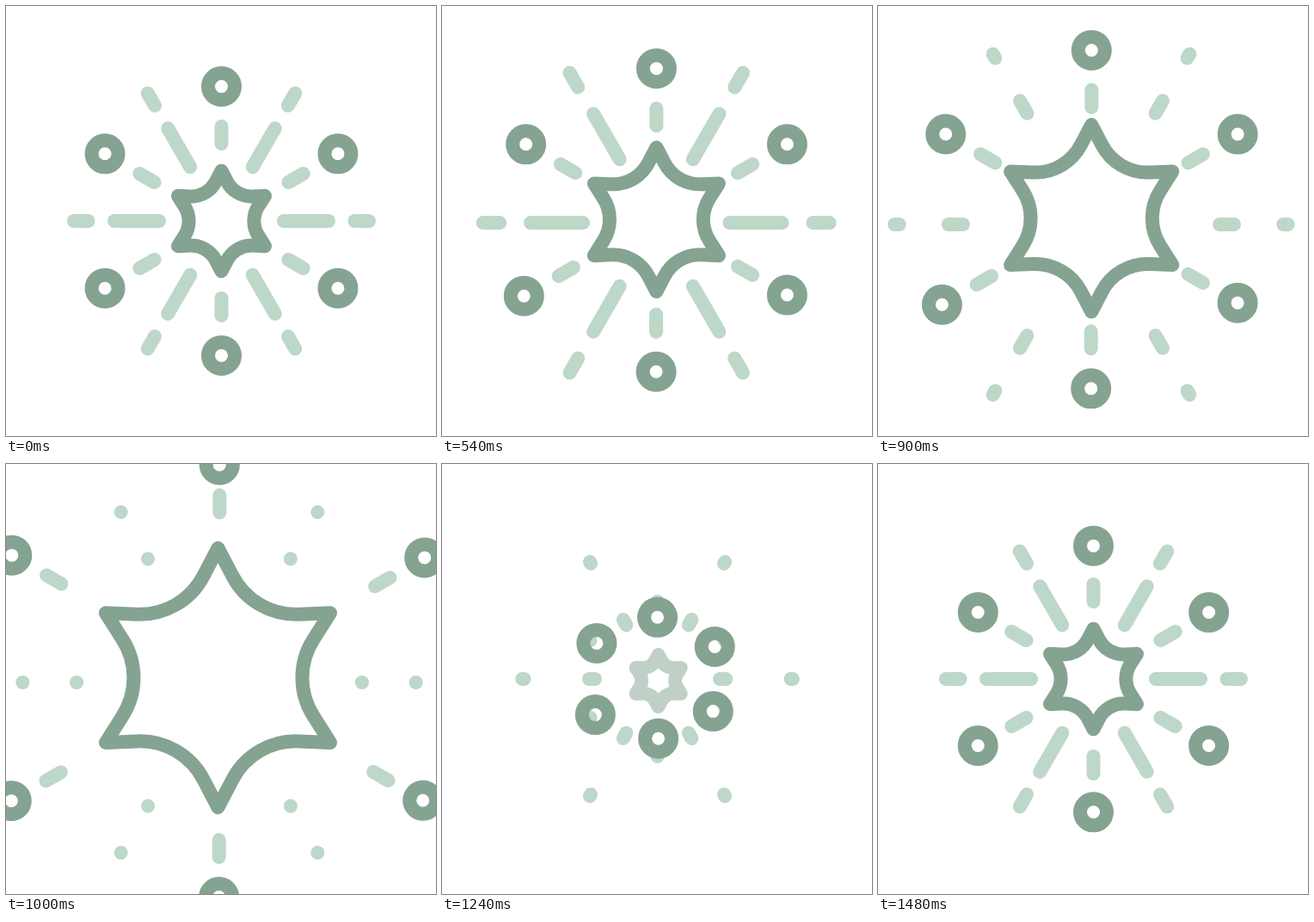
These frames come from a looping animation (500 px wide and 500 px high, 1500 ms). An HTML page with a canvas:

```html
<!DOCTYPE html>
<html lang="en">
<head>
<meta charset="utf-8">
<title>Burst</title>
<style>
  html, body { margin: 0; width: 100%; height: 100%; overflow: hidden; background: #fff; }
  canvas { display: block; width: 500px; height: 500px; }
</style>
</head>
<body>
<canvas id="stage" width="500" height="500"></canvas>
<script>
const ctx = document.getElementById('stage').getContext('2d');
const LOOP = 1500;
const DARK = '#85a391', LIGHT = '#bdd7c8';
const CX = 250.5, CY = 250;
const RAD = Math.PI / 180;

// Per ring, clockwise from the top: drift while swelling, flight while bursting, place of return
const RINGS = [
  { swell: [-2.2, -40], burst: [0, -132], from: [250.5, 182.7], dashBurst: [0, -160] },
  { swell: [29.4, -21], burst: [179, -105], from: [313.6, 214.5] },
  { swell: [29.4, 15], burst: [174, 120.6], from: [311.5, 285.5] },
  { swell: [-2.8, 36], burst: [0, 153.5], from: [251.6, 314.7] },
  { swell: [-37.8, 17.2], burst: [-178, 116], from: [181.6, 289.7] },
  { swell: [-33.3, -21], burst: [-188, -112], from: [183.2, 210.3] }
];

const clamp = x => Math.min(1, Math.max(0, x));
const ramp = (t, a, b) => clamp((t - a) / (b - a));
const mix = (a, b, k) => a + (b - a) * k;

function ease(t, a, b) {
  const x = ramp(t, a, b);
  return x * x * (3 - 2 * x);
}

// Segment on a spoke, between two distances from (x, y)
function spoke(x, y, angle, r0, r1) {
  const c = Math.cos(angle), s = Math.sin(angle);
  ctx.strokeStyle = LIGHT;
  ctx.beginPath();
  ctx.moveTo(x + c * r0, y + s * r0);
  ctx.lineTo(x + c * r1, y + s * r1);
  ctx.stroke();
}

function ring(x, y) {
  ctx.strokeStyle = DARK;
  ctx.beginPath();
  ctx.arc(x, y, 15.5, 0, 2 * Math.PI);
  ctx.stroke();
}

function star(x, y, size, alpha) {
  if (alpha <= 0) return;
  const bend = 33 * RAD;
  ctx.globalAlpha = alpha;
  ctx.strokeStyle = DARK;
  ctx.beginPath();
  for (let i = 0; i < 6; i++) {
    const a = i * 60 * RAD, tip = a - 30 * RAD;
    ctx.lineTo(x + size * Math.cos(tip), y + size * Math.sin(tip));
    ctx.arc(x + 1.2 * size * Math.cos(a), y + 1.2 * size * Math.sin(a),
      0.55 * size, a + Math.PI + bend, a + Math.PI - bend, true);
  }
  ctx.closePath();
  ctx.stroke();
  ctx.globalAlpha = 1;
}

// Two dashes per spoke; lo and hi give the visible share of each
function rays(x, y, scale, lo, hi) {
  if (hi - lo <= 0) return;
  for (let i = 0; i < 6; i++) {
    for (const [a, b] of [[72.5, 124.5], [155, 171.5]]) {
      spoke(x, y, i * 60 * RAD, scale * mix(a, b, lo), scale * mix(a, b, hi));
    }
  }
}

function eachRing(fn) {
  RINGS.forEach((r, i) => {
    const a = (i * 60 - 90) * RAD;
    fn(r, a, CX + 156.4 * Math.cos(a), CY + 156.4 * Math.sin(a));
  });
}

function explode(t) {
  const swell = ease(t, 180, 880), burst = ease(t, 880, 1160);
  rays(CX - 2.5 * swell, CY + 4 * swell, 1 + swell / 3, ease(t, 670, 1010), 1);
  eachRing((r, a, hx, hy) => {
    const at = ([bx, by]) => [
      hx + r.swell[0] * swell + bx * burst,
      hy + r.swell[1] * swell + by * burst
    ];
    spoke(...at(r.dashBurst || r.burst), a, -66.5, -46.5);
    ring(...at(r.burst));
  });
  star(CX - 2.2 * swell - 4.6 * burst, CY - 3.3 * swell + 4.6 * burst,
    58.3 + 48.6 * swell + 110 * burst, 1 - ramp(t, 1010, 1110));
}

function gather(t) {
  const grow = ease(t, 1180, 1480), fly = ease(t, 1200, 1505), dash = ease(t, 1240, 1470);
  rays(CX, CY, 1, 0, ease(t, 1170, 1475));
  eachRing((r, a, hx, hy) => {
    if (dash > 0) spoke(CX, CY, a, 90, 90 + 20 * dash);
    if (t >= 1200) ring(mix(r.from[0], hx, fly), mix(r.from[1], hy, fly));
  });
  star(CX + 1.2 * (1 - grow), CY + 2.2 * (1 - grow), mix(26.7, 58.3, grow), ramp(t, 1200, 1280));
}

function draw() {
  const t = performance.now() % LOOP;
  ctx.fillStyle = '#fff';
  ctx.fillRect(0, 0, 500, 500);
  ctx.lineWidth = 16;
  ctx.lineCap = ctx.lineJoin = 'round';
  (t < 1160 ? explode : gather)(t);
  requestAnimationFrame(draw);
}
draw();
</script>
</body>
</html>
```
